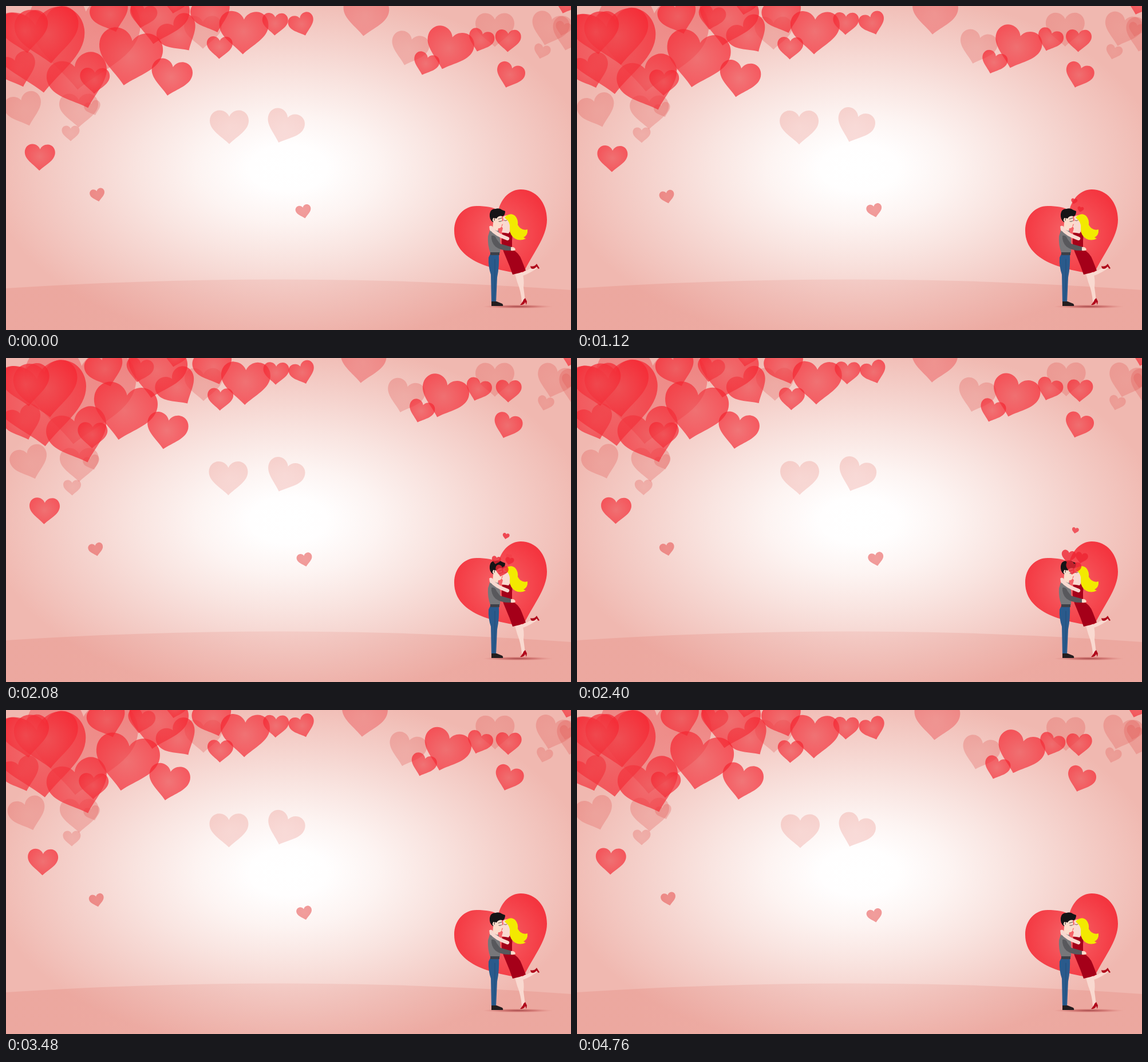
Animation of 987 by 567 pixels, one loop 4800 ms. Source, as an HTML page with a canvas:

```html
<!DOCTYPE html>
<html lang="en">
<head>
<meta charset="utf-8">
<title>Hearts</title>
<style>
html, body { margin: 0; width: 100%; height: 100%; overflow: hidden; background: #f0b8b0; }
canvas { display: block; }
</style>
</head>
<body>
<canvas id="stage" width="987" height="567"></canvas>
<script>
const W = 987, H = 567, LOOP = 4800, STEP = 40;
const { PI, sin, cos, min, max, abs, sqrt } = Math;
const ctx = document.getElementById('stage').getContext('2d');

// Unit heart: one wide, centred on its box.
const HEART = new Path2D('M0,-.27C-.04,-.37 -.14,-.435 -.25,-.435C-.39,-.435 -.5,-.32 -.5,-.17' +
  'C-.5,.09 -.2,.23 0,.435C.2,.23 .5,.09 .5,-.17C.5,-.32 .39,-.435 .25,-.435C.14,-.435 .04,-.37 0,-.27Z');

function radial(g, x, y, r, stops) {
  const grad = g.createRadialGradient(x, y, 0, x, y, r);
  for (const [at, colour] of stops) grad.addColorStop(at, colour);
  return grad;
}
const tint = (inner, outer) => radial(ctx, 0, -.03, .56, [[0, inner], [1, outer]]);
const RED = tint('rgba(238,76,81,.7)', 'rgba(246,34,46,.71)');
const ROSE = tint('rgba(228,76,74,.52)', 'rgba(230,70,70,.54)');
const BLUSH = tint('rgba(234,70,74,.36)', 'rgba(236,62,68,.42)');
const PALE = tint('rgba(226,90,85,.27)', 'rgba(226,85,82,.31)');
const FAINT = tint('rgba(226,100,90,.2)', 'rgba(226,100,90,.23)');

// Hearts that share a fill and a lean; each is x, y, width.
const flocks = [
  { fill: BLUSH, turn: 6, hearts: [[134, 62, 195], [628, 18, 80]] },
  { fill: PALE, turn: -18, hearts: [[32, 182, 66], [152, 179, 29]] },
  { fill: PALE, turn: 0, hearts: [[344, 46, 66], [127, 183, 68], [113, 223, 31], [854, 42, 68]] },
  { fill: PALE, turn: 16, hearts: [[704, 76, 66], [949, 41, 66], [985, 50, 66], [973, 40, 28], [936, 80, 29]] },
  { fill: FAINT, turn: 0, hearts: [[390, 212, 68]] },
  { fill: FAINT, turn: 20, hearts: [[486, 212, 66]] },
  { fill: RED, turn: -32, hearts: [[303, 51, 72]] },
  { fill: RED, turn: -18, hearts: [[183, 17, 68], [129, 134, 107], [21, 113, 68], [360, 17, 70], [517, 33, 45]] },
  { fill: RED, turn: -7, hearts: [[57, 79, 168], [73, 52, 112], [33, 46, 84]] },
  { fill: RED, turn: 2, hearts: [[155, 131, 52], [59, 265, 53], [415, 47, 86], [373, 73, 45], [470, 32, 45], [877, 61, 45]] },
  { fill: RED, turn: 11, hearts: [[239, 18, 48], [266, 22, 104], [295, -4, 40], [215, 91, 112], [288, 126, 72]] },
  { fill: RED, turn: 18, hearts: [[773, 76, 83], [733, 102, 45], [829, 61, 45], [880, 122, 50], [979, -7, 48]] },
  { fill: ROSE, turn: -12, hearts: [[160, 331, 26], [520, 360, 27]] }
];

// A slow breeze: waves across the stage, calmest at its middle column.
function drift(x, y, t) {
  const phase = 2 * PI * t / LOOP;
  const swell = (1 - cos(phase)) / 2, gust = max(0, sin(phase));
  const reach = 12 * sqrt(abs(x - W / 2) / (W / 2));
  const dx = reach * sin(PI * (20 + .8 * min(y, 150) - x) / 265);
  const dy = -3 - 7 * sin(PI * (x - 410) / 480);
  return [swell * dx - 1.5 * gust, swell * dy + 1.5 * gust];
}

// Hearts that float up from the kiss.
const kisses = [
  { born: 500, life: 2700, x: 869, y: 361, rise: 84, size: 12 },
  { born: 500, life: 1700, x: 879, y: 361, rise: 14, size: 11 },
  { born: 1880, life: 1250, x: 857, y: 358, rise: 25, size: 25 },
  { born: 1880, life: 950, x: 866, y: 376, rise: 15, size: 27 },
  { born: 1880, life: 1150, x: 880, y: 359, rise: 20, size: 22 }
];

function heart(x, y, size, turn, fill) {
  ctx.save();
  ctx.translate(x, y);
  ctx.rotate(turn * PI / 180);
  ctx.scale(size, size);
  ctx.fillStyle = fill;
  ctx.fill(HEART);
  ctx.restore();
}

function paintScene(g) {
  const shape = (d, fill) => { g.fillStyle = fill; g.fill(new Path2D(d)); };
  const line = (d, colour, width) => {
    g.strokeStyle = colour;
    g.lineWidth = width;
    g.lineCap = g.lineJoin = 'round';
    g.stroke(new Path2D(d));
  };
  const oval = (x, y, rx, ry, stops) => {
    g.save();
    g.translate(x, y);
    g.scale(rx / ry, 1);
    g.fillStyle = radial(g, 0, 0, ry, stops);
    g.fillRect(-W * 2, -H * 2, W * 4, H * 4);
    g.restore();
  };
  oval(493, 284, 525, 312, [[0, '#fff'], [.13, '#fffefe'], [.3, '#fdf4f2'],
    [.5, '#f9e4e0'], [.75, '#f4cec8'], [1, '#f0b8b0']]);
  shape('M0,494Q250,478 490,478.5T987,497V567H0Z',
    radial(g, 493, 440, 400, [[0, 'rgba(224,120,110,.13)'], [1, 'rgba(224,120,110,.25)']]));
  oval(894, 526, 62, 3.5, [[0, 'rgba(140,40,45,.75)'], [.5, 'rgba(185,75,75,.5)'], [1, 'rgba(220,120,115,0)']]);

  shape('M860,358C865,336 881,321 899,321C926,321 945,344 945,374C945,405 919,434 903,469' +
    'C868,463 783,453 783,393C783,368 800,350 822,350C838,350 852,352 860,358Z',
    radial(g, 862, 398, 88, [[0, '#f5666a'], [.5, '#f54c53'], [1, '#f4353f']]));

  const skin = '#fbdccb', pale = '#f9d9d0', dress = '#a50019', shoe = '#b00a1c';
  // Woman
  line('M899,470Q908,468 924,458', pale, 6);
  shape('M916,455Q923,457 927,451L932,459L930,460L927,456Q922,462 917,459Z', shoe);
  shape('M888,465L901,464Q906,477 904,492L907,516L901,518Q900,500 893,483Z', pale);
  shape('M907,511L910,517L909,523L907,518Q905,524 898,523Q903,518 904,514Z', shoe);
  shape('M867,397L880,396Q886,400 884,410L884,426Q896,431 901,445L908,463Q897,468 885,470Q880,455 873,439Q864,420 866,405Z', dress);
  shape('M868,369Q874,364 882,368L883,388L878,398L866,396L868,389L866,386L868,382L866,379L869,375Z', pale);
  shape('M874,367Q883,361 890,368Q895,374 894,383Q900,394 911,391Q912,401 904,405L908,407Q898,412 889,407Q880,401 880,390Q881,382 877,376L871,370Z', '#f3e900');
  line('M870,375Q872,377 875,375', '#5a3730', .8);
  // Man
  shape('M846,434L861,434Q862,455 858,475L856,519H848L847,470Q842,455 843,440Z', '#2a5a8c');
  line('M854,443Q855,480 852,517', '#214c79', 1);
  shape('M848,517H857L867,521Q869,523 868,525H848Z', '#241d1f');
  shape('M846,390Q853,386 860,393Q865,407 863,432H846Q841,418 842,403Z', '#77777a');
  shape('M846,431H862V436H846Z', '#3d4048');
  shape('M852,370L866,366L867,376L869,380L866,383Q866,389 860,389L859,394L850,390Z', skin);
  shape('M845,364Q846,355 855,355Q862,353 867,357L872,359Q872,366 868,368Q860,366 857,372L854,371L853,378H850Q844,373 845,364Z', '#151416');
  line('M852,372Q850,376 853,377', skin, 2.5);
  line('M860,373L866,371M861,377Q864,378 866,376', '#2b2020', .8);
  // Embrace
  line('M848,390Q856,400 876,407', pale, 6.5);
  shape('M844,386Q847,383 850,386L852,393L846,394Z', pale);
  shape('M848,402Q854,400 857,408L863,416L884,422L883,428Q865,429 855,421Q847,413 848,402Z', '#58585c');
  shape('M882,422Q888,421 890,426Q889,429 882,428Z', skin);
}

const scene = document.createElement('canvas');
scene.width = W;
scene.height = H;
paintScene(scene.getContext('2d'));

function draw(t) {
  ctx.drawImage(scene, 0, 0);
  for (const { fill, turn, hearts } of flocks)
    for (const [x, y, size] of hearts) {
      const [dx, dy] = drift(x, y, t);
      heart(x + dx, y + dy, size, turn, fill);
    }

  for (const { born, life, x, y, rise, size } of kisses) {
    const p = (t - born) / life;
    if (p <= 0 || p >= 1) continue;
    const sway = -.06 * rise * cos(2 * PI * p);
    ctx.globalAlpha = .8 * min(1, 3 * (1 - p));
    heart(x + sway, y - rise * p, size * min(1, 4 * p), 12, '#ee2432');
  }
  ctx.globalAlpha = 1;
}

const start = performance.now();
function tick() {
  const t = (performance.now() - start) % LOOP;
  draw(Math.floor(t / STEP) * STEP);
  requestAnimationFrame(tick);
}
tick();
</script>
</body>
</html>
```
